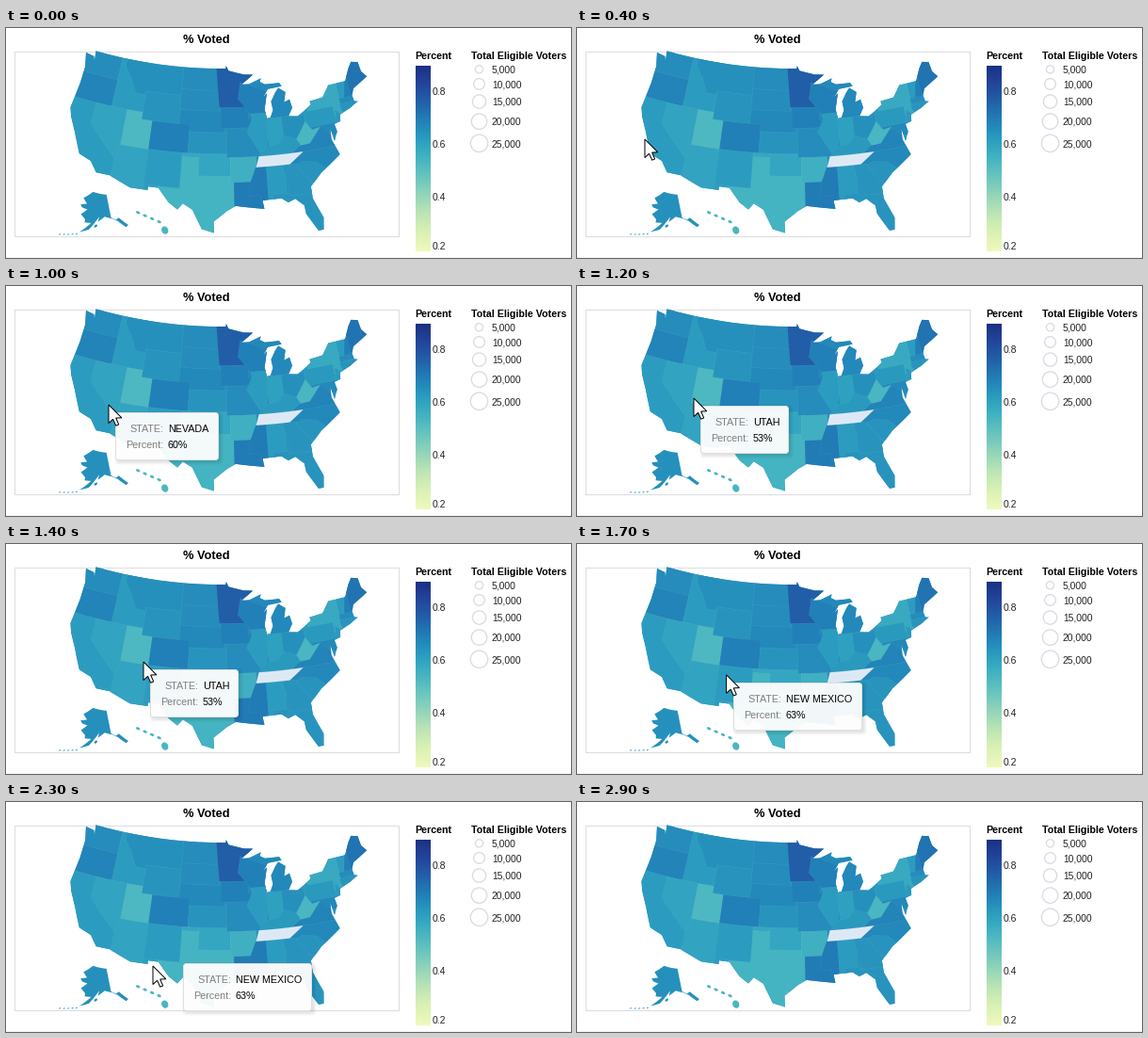
A matplotlib script for the animation above (3 s loop, 600 by 244 pixels).

```python
import numpy as np
import matplotlib.pyplot as plt
from matplotlib.animation import FuncAnimation
from matplotlib.colors import LinearSegmentedColormap
from matplotlib.patches import Circle, Ellipse, FancyBboxPatch, Polygon, Rectangle
from matplotlib.textpath import TextPath

W, H, DPI = 600, 244, 100
FRAMES, STEP = 30, 100
PT = 72 / DPI
FONT = "Liberation Sans"
SX, SY = 436, 431
LOW, HIGH = 0.195, 0.896

cmap = LinearSegmentedColormap.from_list("ygb", [
    "#eff9bd", "#dbf1b4", "#bde5b5", "#94d5b9", "#69c5be", "#45b4c2",
    "#2c9ec0", "#2182b8", "#2163aa", "#23479c", "#1c3185"])

fig = plt.figure(figsize=(W / DPI, H / DPI), dpi=DPI, facecolor="white")
ax = fig.add_axes([0, 0, 1, 1])


def label(x, y, s, size, color="black", **kw):
    return ax.text(x, y, s, fontsize=size * PT, family=FONT, color=color,
                   va="baseline", **kw)


def text_width(s, size):
    return TextPath((0, 0), s, size=size, prop={"family": FONT}).get_extents().x1


def shade(pct):
    return cmap((pct - LOW) / (HIGH - LOW))


def conic(lat1, lat2, meridian, center, scale, origin):
    """Equal-area conic projection; longitudes count westwards."""
    s1, s2 = np.sin(np.radians([lat1, lat2]))
    n = (s1 + s2) / 2
    c = 1 - s1 ** 2 + 2 * n * s1

    def raw(lon, lat):
        rho = np.sqrt(c - 2 * n * np.sin(np.radians(lat))) / n
        a = n * np.radians(meridian - lon)
        return rho * np.sin(a), rho * np.cos(a)

    x0, y0 = raw(*center)

    def project(lon, lat):
        x, y = raw(lon, lat)
        return (origin[0] + SX * scale * (x - x0),
                origin[1] + SY * scale * (y - y0))
    return project


mainland = conic(29.5, 45.5, 96, (96.6, 38.7), 1, (225.7, 120.8))
alaska = conic(55, 65, 154, (156, 58.5), 0.35, (91.8, 207.4))
hawaii = conic(8, 18, 157, (160, 19.9), 1, (136.4, 212.2))


def region(pct, flat, project=mainland, **kw):
    """Fill a ring of lon, lat pairs, its edges following the parallels."""
    ring = np.array(flat).reshape(-1, 2)
    ring = np.vstack([ring, ring[:1]])
    k = np.arange(len(ring))
    t = np.linspace(0, k[-1], 10 * k[-1] + 1)
    x, y = project(np.interp(t, k, ring[:, 0]), np.interp(t, k, ring[:, 1]))
    style = {"fc": shade(pct), "lw": 0, "zorder": 2} | kw
    return ax.add_patch(Polygon(np.column_stack([x, y]), **style))


def state(pct, *flat, **kw):
    """West, south, east, north of a box, or a ring; the coast trims both."""
    if len(flat) == 4:
        w, s, e, n = flat
        flat = w, n, e, n, e, s, w, s
    region(pct, flat, ec=(1, 1, 1, 0.08), lw=0.5 * PT, **kw).set_clip_path(land)


def island(pct, project, lon, lat, w, h, tilt):
    ax.add_patch(Ellipse(project(lon, lat), w, h, angle=tilt, lw=0,
                         fc=shade(pct), zorder=2))


# Frame and title
ax.add_patch(Rectangle((8.5, 24.5), 408, 196, fc="none", ec="#dcdcdf", lw=PT, zorder=1))
ax.plot([0, W], [242.5, 242.5], color="#efefef", lw=PT)
label(212.5, 16.5, "% Voted", 12.7, weight="bold", ha="center")

# Coastline, clockwise from the north-west
north = [124.7, 48.4, 122.9, 48.2, 122.5, 47.5, 122.8, 49, 95.2, 49, 95.1, 49.4,
         94.6, 48.7, 91.5, 48.1, 89.6, 48, 92, 46.7, 90.5, 46.7, 88, 47.4,
         88.3, 46.9, 87.3, 46.5, 84.4, 46.5, 84, 46, 86.8, 45.8, 88, 44.6,
         87.1, 45.2, 87.8, 43, 87.5, 41.7, 86.8, 41.8, 86.2, 42.8, 86.4, 44,
         85.4, 45.2, 84.7, 45.8, 83.4, 45.1, 83.9, 43.7, 82.8, 44, 82.5, 42.8,
         83.4, 41.7, 81.7, 41.5, 78.9, 42.8, 79, 43.3, 76.4, 43.5, 74.8, 45,
         71.4, 45]
atlantic = [70.1, 46.6, 69.2, 47.4, 67.9, 47.1, 67.8, 45.7, 67, 44.8, 70.2, 43.7,
            70.8, 42.8, 70.7, 42, 70, 41.8, 72, 41.1, 73.9, 40.6, 74.1, 39.7,
            75.3, 39.5, 75.1, 38.4, 75.9, 37.2, 76.2, 39, 76.4, 37.5, 75.5, 35.2,
            77.9, 33.9, 79.2, 33.2, 81.3, 31.5, 81.3, 29.8, 80.1, 26.9, 80.4, 25.2]
gulf = [81.2, 25.2, 82.7, 27.8, 82.8, 29, 84.1, 30.1, 85.3, 29.7, 86.3, 30.4,
        89.4, 30.3, 89.2, 29.1, 93.8, 29.7, 95.2, 29, 97.3, 27.5, 97.2, 25.9,
        99.1, 26.4, 100.7, 29.1, 102.3, 29.9, 103.1, 29, 104.6, 29.9]
pacific = [106.5, 31.8, 108.2, 31.8, 108.2, 31.3, 111.1, 31.3, 114.8, 32.5,
           117.1, 32.5, 118.4, 33.9, 120.6, 34.5, 122.4, 37.3, 123.8, 39.2,
           124.4, 40.4, 124, 44, 124, 46.5]
land = region(.65, north + atlantic + gulf + pacific)

# States, later ones covering earlier ones. West
state(.66, 125, 45.8, 117, 50)
state(.68, 125, 42, 117, 45.8)
state(.62, 117, 42, 111, 49.2)
state(.65, 116, 49.2, 104, 49.2, 104, 45, 111, 45, 111, 44.5, 113, 44.5, 114.4, 46.5, 116, 48)
state(.62, 125, 32, 114, 42)
state(.60, 120, 42, 114, 42, 114, 36, 114.6, 35, 120, 39)
state(.60, 114.7, 31, 109, 31, 109, 37, 114, 37, 114, 36.2, 114.6, 35)
state(.53, 114, 37, 109, 42)
state(.64, 111, 41, 104, 45)

# Plains and the Mississippi
state(.66, 104, 45.9, 96.5, 49.2)
state(.66, 104, 43, 96.5, 45.9)
state(.67, 104, 40, 95.5, 43)
state(.69, 109, 37, 102, 41)
state(.64, 102, 37, 94.6, 40)
state(.55, 107, 25, 93.8, 36.5)
state(.62, 109, 32, 103, 37)
state(.62, 109, 31, 106.6, 32)
state(.59, 100, 33.9, 94.5, 37)
state(.59, 103, 36.5, 100, 37)
state(.66, 95.1, 36.5, 89.2, 40.6)
state(.69, 96.2, 40.6, 90.4, 43.5)
state(.56, 94.5, 33, 90, 36.5)
state(.70, 94, 29, 89, 33)
state(.70, 91.2, 33, 90.2, 35, 88.2, 35, 88.4, 30, 89.7, 30, 89.7, 31, 91.6, 31)

# Great Lakes
state(.67, 91, 41.7, 82, 48)
state(.77, 97.2, 49.5, 89, 49.5, 89, 47.5, 92.2, 46.6, 92.8, 44.7, 91.2, 43.5, 96.5, 43.5)
state(.69, 92.3, 47, 90.4, 46.6, 86.8, 45.4, 87, 42.5, 90.6, 42.5, 92.8, 44.7)
state(.62, 90.6, 42.5, 87.5, 42.5, 87.5, 39, 88.2, 37.5, 89.2, 37, 91.4, 40, 90.3, 41.8)
state(.61, 87.5, 37.8, 84.8, 41.7)
state(.65, 84.8, 38.5, 80.5, 41.7)

# Northeast
state(.58, 79.8, 40.5, 73.3, 45.2)
state(.63, 80.5, 39.7, 74.9, 42)
state(.63, 75.5, 38.8, 73.5, 39.5, 73.9, 41, 74.7, 41.4, 74.8, 40.2)
state(.67, 79.5, 38, 75, 39.7)
state(.62, 73.3, 42.7, 71.5, 45.2)
state(.69, 72.4, 42.7, 71.5, 45.2, 70.8, 45.2, 70.7, 42.7)
state(.72, 71, 43, 66, 48)
state(.66, 73.4, 42, 69.5, 42.8)
state(.64, 73.5, 41.1, 71.2, 42)

# South
state(.62, 88.4, 30, 85.3, 35)
state(.64, 87.6, 24, 79, 31)
state(.64, 85.6, 35, 83.1, 35, 81, 32, 81, 30.6, 85, 30.6, 85, 32)
state(.68, 83.7, 36.5, 75, 36.5, 76, 37.9, 77.8, 39.4, 82, 37.5)
state(.54, 82.6, 38.3, 82, 37.4, 80.3, 37.5, 78, 39.5, 79.5, 39.3, 80.5, 40.6)
state(.63, 89.4, 36.5, 83.7, 36.5, 82, 37.5, 82.6, 38.4, 84.8, 39.1, 86, 38, 88, 37.8)
state(.67, 84.3, 35, 81.7, 36.5, 75, 36.5, 75, 34, 78.5, 33.5, 83, 34.9)
state(.64, 83.3, 34.7, 82.2, 35.2, 79.7, 34.8, 78, 33.4, 79, 32, 81, 32)
state(0, 90.1, 35, 84.3, 35, 81.7, 36.5, 89.5, 36.5, fc="#dce9f5")

# Alaska with its island arc, then Hawaii
region(.65, [156.5, 71.3, 141, 69.7, 141, 60.3, 137.5, 59, 135, 59.5, 130, 55.5,
             132, 55, 136.5, 58.3, 140, 59.7, 146, 61, 151.8, 59.2, 150.5, 61.2,
             154, 59, 158.5, 56, 164.8, 54.6, 157, 58.7, 162, 58.7, 162, 60,
             166, 61.8, 161, 64, 166, 64.5, 168, 65.6, 162, 66.3, 166.4, 68.4],
       project=alaska)
island(.65, alaska, 153.5, 57.5, 4, 2.4, -40)
for lon in np.linspace(166.5, 177, 5):
    island(.65, alaska, lon, 53.7 - 0.19 * (lon - 166.5), 2.2, 1, -15)
for u in np.linspace(0, 1, 4):
    island(.54, hawaii, 159.5 - 3.15 * u, 22.1 - 1.3 * u, 4.6, 2.8, 25)
island(.54, hawaii, 155.5, 19.6, 7, 8.5, -25)

# Legends
label(434.5, 32.8, "Percent", 10.6, weight="bold")
ax.imshow(np.linspace(1, 0, 197)[:, None], cmap=cmap, aspect="auto",
          extent=(435, 451, 237, 40), zorder=2)
for v in (0.8, 0.6, 0.4, 0.2):
    label(453, min(291.7 - 281 * v, 231) + 3.8, f"{v}", 10.4, "#222222")

label(493.5, 32.8, "Total Eligible Voters", 10.6, weight="bold")
y, last = 34, 0
for v in range(5000, 25001, 5000):
    r = 9.2 * np.sqrt(v / 25000)
    y += last + r + 5.7
    last = r
    ax.add_patch(Circle((502.5, y), r, fc="none", ec="#dadae2", lw=1.3 * PT))
    label(516, y + 3.8, f"{v:,}", 10.3, "#222222")

# Tooltip: a soft shadow, the card and two rows
SIZE = 10.7


def card(pad, **kw):
    box = FancyBboxPatch((0, 0), 1, 1, zorder=5,
                         boxstyle=f"round,pad={pad},rounding_size=3", **kw)
    return ax.add_patch(box)


shadow = [card(p, fc="black", lw=0, alpha=0.028) for p in range(4)]
panel = card(0, fc=(1, 1, 1, 0.95), ec="#dfdfdf", lw=PT)
keys = [label(0, 0, s, SIZE, "#808080", ha="right", zorder=6)
        for s in ("STATE:", "Percent:")]
values = [label(0, 0, "", SIZE, zorder=6) for _ in keys]
tooltip = [*shadow, panel, *keys, *values]

ARROW = 1.15 * np.array([(0, 0), (0, 17), (4, 13.3), (6.7, 19.3), (9.3, 18.2),
                         (6.7, 12.2), (12, 12)])
cursor = ax.add_patch(Polygon(ARROW, fc="white", ec="black", lw=PT, zorder=8))

# Pointer path as time, x, y; the tooltip stays where the map was left
PATH = np.array([(100, 8, 104), (400, 72, 118), (600, 97, 124), (1000, 109, 126),
                 (1200, 124, 119), (1400, 146, 125), (1900, 167, 148),
                 (2200, 181, 163), (2300, 156, 174), (2400, 137, 187)])
HOVER = [(500, "CALIFORNIA", "63%"), (1000, "NEVADA", "60%"),
         (1200, "UTAH", "53%"), (1600, "NEW MEXICO", "63%")]
LEAVE, HIDE = 2200, 2400


def pointer(t):
    return np.array([np.interp(t, PATH[:, 0], PATH[:, k]) for k in (1, 2)])


def place_tooltip(t):
    _, name, pct = [h for h in HOVER if h[0] <= t][-1]
    x, y = np.round(pointer(min(t, LEAVE)) + (7, 8)) + 0.5
    w = round(66 + text_width(name, SIZE))
    for box in shadow:
        box.set_bounds(x + 2, y + 2, w, 50)
    panel.set_bounds(x, y, w, 50)
    for k, (key, value, s) in enumerate(zip(keys, values, (name, pct))):
        base = y + 20.8 + 16.5 * k
        key.set_position((x + 51, base))
        value.set_position((x + 55.5, base))
        value.set_text(s)


def update(i):
    t = i * STEP
    cursor.set_visible(PATH[0, 0] <= t <= PATH[-1, 0])
    cursor.set_xy(ARROW + pointer(t))
    shown = HOVER[0][0] <= t < HIDE
    for artist in tooltip:
        artist.set_visible(shown)
    if shown:
        place_tooltip(t)
    return [cursor, *tooltip]


ax.set_xlim(0, W)
ax.set_ylim(H, 0)
ax.axis("off")
anim = FuncAnimation(fig, update, frames=FRAMES, interval=STEP, repeat=True,
                     repeat_delay=0)
plt.show()
```
